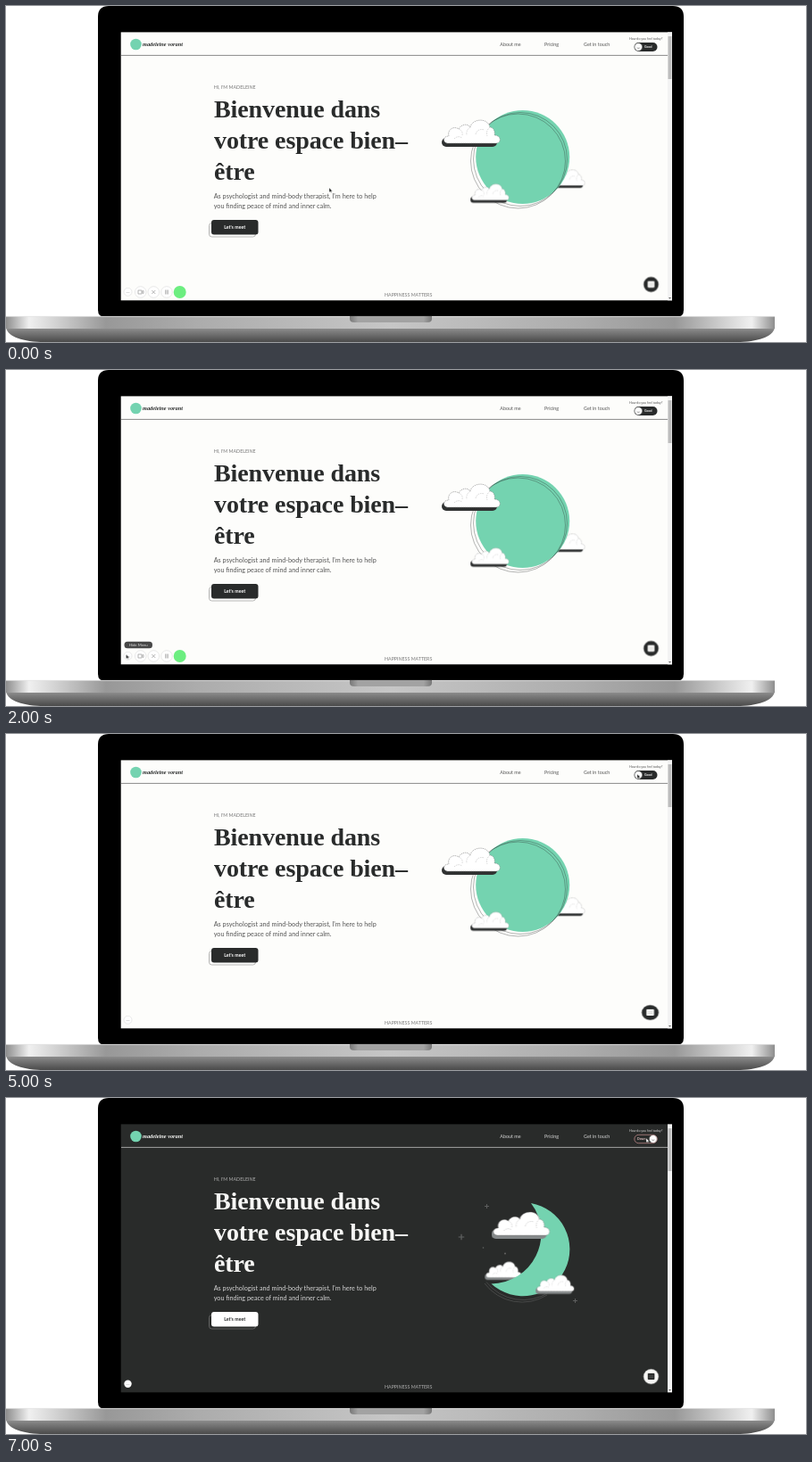
Animation, 896 px wide and 377 px high, one loop 8000 ms. Source, as an HTML page:

```html
<!DOCTYPE html>
<html lang="fr">
<head>
<meta charset="utf-8">
<title>Laptop mock-up</title>
<style>
html, body { margin: 0; width: 100%; height: 100%; overflow: hidden; background: #fff; }
svg { display: block; width: 896px; height: 377px; animation: theme 8s step-end infinite; }
text { font-family: Lato, sans-serif; fill: var(--text); }
.h { font: bold 28px "Liberation Serif", serif; letter-spacing: -.1px; fill: var(--fg); }
.brand { font: italic bold 6.3px "Liberation Serif", serif; fill: var(--fg); }
.nav { font-size: 5.4px; }
.p { font-size: 7.25px; }
.caps { font-size: 5.3px; fill: var(--soft); }
.bg { fill: var(--bg); }
.fg { fill: var(--fg); }
.ring { fill: none; stroke: #2b2d2c; stroke-width: .35; }
.base { fill: var(--shade); }

.light, .dark, .sun, .moon, .bar, .tip, .ibeam, .arrow, .chat, .knob, .c1, .c2, .c3 {
  animation: 8s step-end infinite;
}
.light { animation-name: light; }
.dark { animation-name: dark; }
.sun { animation-name: sun; }
.moon { animation-name: moon; }
.bar { animation-name: bar; }
.tip { animation-name: tip; }
.ibeam { animation-name: ibeam; }
.arrow { animation-name: arrow; fill: var(--fg); stroke: var(--bg); stroke-width: .3; }
.chat { animation-name: chat; }
.knob { animation-name: knob; }
.c1 { animation-name: c1; }
.c2 { animation-name: c2; }
.c3 { animation-name: c3; }

@keyframes theme {
  0% {
    --bg: #fdfdfb; --fg: #292b2b; --text: #555; --soft: #777; --line: #8a8a8a;
    --btn: #292b2b; --label: #fff; --shade: #303232; --edge: #999;
  }
  75% {
    --bg: #292b2a; --fg: #f7f7f5; --text: #d6d6d6; --soft: #b0b0b0; --line: #a2a2a2;
    --btn: #bdbdbd; --label: #444; --shade: #85898a; --edge: #777;
  }
  87.5%, 100% {
    --bg: #292b2a; --fg: #f7f7f5; --text: #d6d6d6; --soft: #b0b0b0; --line: #a2a2a2;
    --btn: #fff; --label: #292b2b; --shade: #85898a; --edge: #777;
  }
}
@keyframes light { 0% { opacity: 1 } 75%, 100% { opacity: 0 } }
@keyframes dark { 0% { opacity: 0 } 75%, 100% { opacity: 1 } }
@keyframes sun { 0% { opacity: 1 } 87.5%, 100% { opacity: 0 } }
@keyframes moon { 0% { opacity: 0 } 87.5%, 100% { opacity: 1 } }
@keyframes bar { 0% { opacity: 1 } 37.5%, 100% { opacity: 0 } }
@keyframes tip { 0% { opacity: 0 } 25% { opacity: 1 } 37.5%, 100% { opacity: 0 } }
@keyframes ibeam { 0% { opacity: 0 } 37.5% { opacity: 1 } 50%, 100% { opacity: 0 } }
@keyframes arrow {
  0% { transform: translate(362px, 204px) }
  12.5% { transform: translate(200px, 290px) }
  25% { transform: translate(134.5px, 319px) }
  37.5% { transform: translate(-20px, 0) }
  50% { transform: translate(640px, 118px) }
  62.5% { transform: translate(707px, 45px) }
  75% { transform: translate(719.5px, 45px) }
  87.5%, 100% { transform: translate(717px, 45px) }
}
@keyframes chat {
  0% { transform: translate(722.5px, 312.5px) }
  62.5% { transform: translate(721.5px, 312.5px) scale(1.13, 1) }
  75%, 100% { transform: translate(722.5px, 312.5px) }
}
@keyframes knob {
  0% { transform: translateX(708.3px) }
  75% { transform: translateX(721.5px) }
  87.5%, 100% { transform: translateX(724.7px) }
}
@keyframes c1 {
  0% { transform: translate(490px, 127px) }
  75% { transform: translate(500px, 127px) }
  87.5%, 100% { transform: translate(545.5px, 127px) }
}
@keyframes c2 {
  0% { transform: translate(521.5px, 199px) }
  75% { transform: translate(543px, 198px) }
  87.5%, 100% { transform: translate(594.5px, 198px) }
}
@keyframes c3 {
  0% { transform: translate(608.5px, 183px) }
  75% { transform: translate(606.5px, 183px) }
  87.5%, 100% { transform: translate(537.5px, 183px) }
}
</style>
</head>
<body>
<svg viewBox="0 0 896 377">
  <defs>
    <linearGradient id="deck">
      <stop offset="0" stop-color="#8e8e8e"/>
      <stop offset=".03" stop-color="#f0f0f0"/>
      <stop offset=".065" stop-color="#d2d2d2"/>
      <stop offset=".13" stop-color="#989898"/>
      <stop offset=".25" stop-color="#acacac"/>
      <stop offset=".5" stop-color="#c6c6c6"/>
      <stop offset=".75" stop-color="#acacac"/>
      <stop offset=".87" stop-color="#989898"/>
      <stop offset=".935" stop-color="#d2d2d2"/>
      <stop offset=".97" stop-color="#f0f0f0"/>
      <stop offset="1" stop-color="#8e8e8e"/>
    </linearGradient>
    <linearGradient id="under" x2="0" y2="1">
      <stop offset="0" stop-color="#909090"/>
      <stop offset="1" stop-color="#4a4a4a"/>
    </linearGradient>
    <linearGradient id="notch">
      <stop offset="0" stop-color="#777"/>
      <stop offset=".1" stop-color="#a2a2a2"/>
      <stop offset=".9" stop-color="#a2a2a2"/>
      <stop offset="1" stop-color="#777"/>
    </linearGradient>
    <g id="cloud">
      <rect class="base" x="-2" y="21" width="62" height="10" rx="5"/>
      <path d="M4 27C-1 26-1 19 6 19C4 12 11 7 17 11C20 5 28 5 30 9C32-1 50-2 52 9C57 9 58 16 57 18C65 18 65 27 59 27Z"
        fill="#fff" stroke="#888" stroke-width=".6" stroke-dasharray="1.5 .7"/>
      <path d="M17 11q5 2 4 7M30 9q-5 3-4 9M36 17q2-7 10-5M52 9q-5 4-3 10M12 22q4-4 9-1"
        fill="none" stroke="#aaa" stroke-width=".5" stroke-dasharray="1.5 1"/>
    </g>
    <path id="plus" d="M-2.500 0H2.500M0-2.500V2.500"/>
  </defs>

  <!-- laptop -->
  <path d="M103 12Q103 0 115 0H747Q759 0 759 12V341Q759 349 751 349H111Q103 349 103 341Z"/>
  <path d="M0 361H861C859 371 842 377 818 377H43C19 377 2 371 0 361Z" fill="url(#under)"/>
  <rect y="348" width="861" height="14" fill="url(#deck)"/>
  <path d="M0 348.400H861" stroke="#e2e2e2" stroke-width=".8"/>
  <path d="M385 348H477V351Q477 355 472 355H390Q385 355 385 351Z" fill="url(#notch)"/>

  <!-- page -->
  <rect class="bg" x="128.700" y="29.400" width="617.300" height="300.900"/>
  <path d="M129 55.400H741" stroke="var(--line)"/>
  <circle cx="145.500" cy="43" r="6.300" fill="#74d3b0"/>
  <text class="brand" x="153" y="45.200">madeleine vorant</text>
  <g class="nav">
    <text x="553.300" y="45">About me</text>
    <text x="603" y="45">Pricing</text>
    <text x="647" y="45">Get in touch</text>
  </g>
  <text x="698" y="38.300" font-size="3.600">How do you feel today?</text>

  <text class="caps" x="232.700" y="92.500">HI, I'M MADELEINE</text>
  <text class="h" x="233" y="125">Bienvenue dans</text>
  <text class="h" x="233" y="160">votre espace bien–</text>
  <text class="h" x="233" y="195">être</text>
  <text class="p" x="232.700" y="215.800">As psychologist and mind-body therapist, I'm here to help</text>
  <text class="p" x="232.700" y="227.400">you finding peace of mind and inner calm.</text>
  <rect x="227.500" y="243.500" width="52" height="15.500" rx="3" fill="none" stroke="var(--edge)" stroke-width=".7"/>
  <rect x="230" y="240" width="52.500" height="16.500" rx="3" fill="var(--btn)"/>
  <text x="256.200" y="250.300" font-size="5.300" font-weight="bold" text-anchor="middle" style="fill:var(--label)">Let's meet</text>
  <text class="caps" x="424" y="326.200">HAPPINESS MATTERS</text>

  <!-- sky -->
  <g class="c3"><use href="#cloud" transform="scale(.63 .68)"/></g>
  <g class="sun">
    <circle cx="578.700" cy="169.500" r="52.500" fill="#74d3b0"/>
    <circle class="ring" cx="573.500" cy="174" r="53"/>
    <circle class="ring" cx="576" cy="172" r="52.500"/>
  </g>
  <g class="moon">
    <g fill="none" stroke="#777" stroke-width=".4">
      <path d="M536 208A52.500 52.500 0 0 0 606 221"/>
      <path d="M538 206.500A52.500 52.500 0 0 0 608 218"/>
    </g>
    <path d="M588 118A52.500 52.500 0 1 1 543.500 208.500A56.500 56.500 0 0 0 588 118Z" fill="#74d3b0"/>
    <g stroke="#626464" stroke-width=".9">
      <use href="#plus" x="538.500" y="121.500"/>
      <use href="#plus" transform="translate(510 156) scale(1.300)"/>
      <use href="#plus" x="637.500" y="227.500"/>
    </g>
    <circle cx="534.500" cy="168" r=".8" fill="#666"/>
    <circle cx="559" cy="174.500" r="1" fill="#666"/>
  </g>
  <g class="c2"><use href="#cloud" transform="scale(.66 .7)"/></g>
  <g class="c1"><use href="#cloud"/></g>

  <!-- mood switch -->
  <g class="light">
    <rect x="703.500" y="41" width="26" height="10" rx="5" fill="#292b2b"/>
    <text x="715" y="47.300" font-size="3.500" font-weight="bold" style="fill:#fff">Good</text>
  </g>
  <g class="dark">
    <rect x="703.800" y="41.300" width="25.500" height="9.400" rx="4.700" fill="#292b2a" stroke="#b98585" stroke-width=".8"/>
    <text x="707" y="47.300" font-size="3.500" font-weight="bold" style="fill:#e3c6c6">Down</text>
  </g>
  <g class="knob">
    <circle cy="46" r="4.200" fill="#fff"/>
    <path d="M-1.500 46.800q1.500 1.500 3 0" fill="none" stroke="#555" stroke-width=".6"/>
  </g>

  <!-- scrollbar -->
  <rect x="741" y="29.400" width="5" height="300.900" fill="#f3f3f3"/>
  <rect x="741.500" y="34" width="4" height="48" fill="#bdbdbd"/>
  <path d="M742 327h3l-1.500 1.800z" fill="#666"/>

  <!-- chat button -->
  <g class="chat">
    <circle class="fg" r="8.400"/>
    <rect class="bg" x="-3.800" y="-3.800" width="7.600" height="7.200" rx=".8"/>
    <path d="M-2.500-1H2.500M-2.500 1H2.500" stroke="var(--fg)" stroke-width=".4" opacity=".5"/>
  </g>

  <!-- recorder bar -->
  <circle cx="136.500" cy="320.800" r="4.200" fill="#fff"/>
  <circle class="light" cx="136.500" cy="320.800" r="4.500" fill="none" stroke="#ddd" stroke-width=".6"/>
  <path d="M134.500 321.300h4" stroke="#bbb" stroke-width=".6"/>
  <g class="bar">
    <g fill="#fff" stroke="#e2e2e2" stroke-width=".8">
      <circle cx="150.700" cy="321" r="6.300"/>
      <circle cx="165.300" cy="321" r="6.300"/>
      <circle cx="180" cy="321" r="6.300"/>
    </g>
    <g fill="none" stroke="#a2a2a2" stroke-width=".8">
      <path d="M148 319h4v4h-4zM152 320.500l2-1v3l-2-1"/>
      <path d="M163.300 319l4 4M167.300 319l-4 4"/>
      <path d="M178.900 318.600v4.800M181.100 318.600v4.800" stroke-width="1.100"/>
    </g>
    <circle cx="194.700" cy="321" r="7" fill="#6cee80"/>
  </g>
  <g class="tip">
    <rect x="132.500" y="304.700" width="31.500" height="7.600" rx="3.500" fill="#484848"/>
    <text x="148.200" y="310" font-size="4.300" text-anchor="middle" style="fill:#ddd">Hide Menu</text>
  </g>

  <!-- pointers -->
  <path class="ibeam" d="M446 133.500h2.400M447.200 133.500v5.500M446 139h2.400" fill="none" stroke="#888" stroke-width=".6"/>
  <path class="arrow" d="M0 0V5L1.200 4 2 5.600 2.800 5.200 2 3.700H3.600Z"/>
</svg>
</body>
</html>
```
